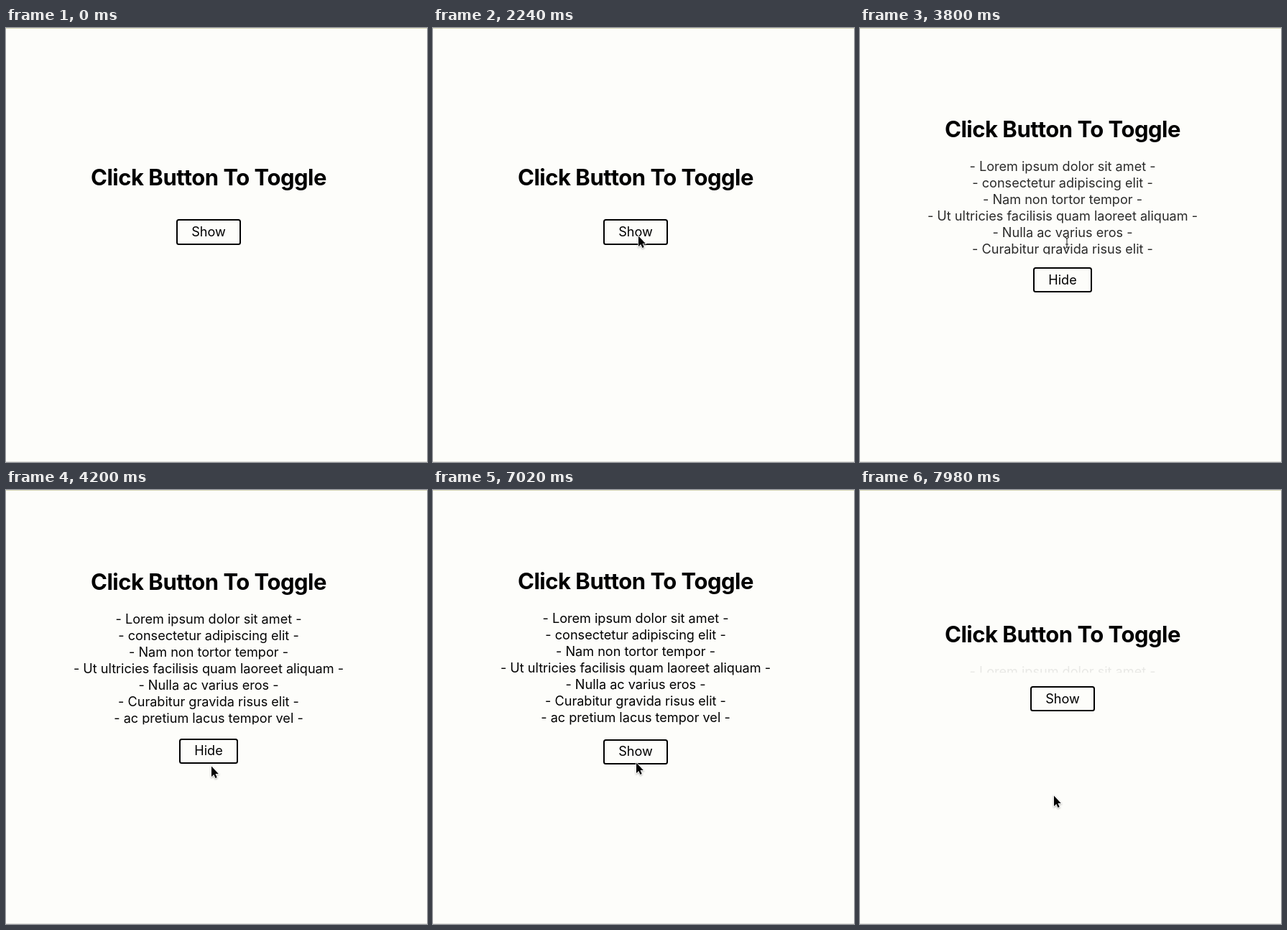
Write an HTML page that moves like this. It is 586 by 604 pixels and loops after 8000 ms.

```html
<!DOCTYPE html>
<html lang="en">
<head>
<meta charset="utf-8">
<title>Toggle</title>
<style>
  html, body { margin: 0; height: 100%; overflow: hidden; background: #fdfdfa; }
  svg { display: block; width: 586px; height: 604px; }
  text { font: 18.1px Inter, sans-serif; font-optical-sizing: none; text-anchor: middle; }
  #title { font-size: 31px; font-weight: 700; letter-spacing: -.49px; }
</style>
</head>
<body>
<svg viewBox="0 0 586 604">
  <defs>
    <clipPath id="clip"><rect id="window" x="80" width="404"/></clipPath>
  </defs>
  <path d="M0 .5H586" stroke="#d9d9b8"/>
  <path d="M0 603.5H586" stroke="#dededa"/>
  <text id="title" x="282">Click Button To Toggle</text>
  <g clip-path="url(#clip)"><g id="list"></g></g>
  <rect id="frame" rx="2.5" fill="none" stroke="#000" stroke-width="2"/>
  <text id="label" x="282"></text>
  <g id="cursor">
    <path id="arrow" d="M0 .5V15L3.3 12 5.5 17 7.7 16 5.5 11H9.8Z" stroke="#fff" stroke-width="1.5"
      paint-order="stroke" style="filter: drop-shadow(0 1px 1px #0005)"/>
    <path id="beam" d="M-3 -7.5Q0 -7.5 0 -5V5Q0 7.5 -3 7.5M3 -7.5Q0 -7.5 0 -5M0 5Q0 7.5 3 7.5M-2 2H2"
      fill="none" stroke="#222"/>
  </g>
</svg>
<script>
const LOOP = 8000, OPEN = 3100, OPEN_TIME = 1320;
const PRESS = 7000, CLOSE = 7015, CLOSE_TIME = 1480;
const LINE = 23, MID = 282;
const lines = [
  'Lorem ipsum dolor sit amet', 'consectetur adipiscing elit', 'Nam non tortor tempor',
  'Ut ultricies facilisis quam laoreet aliquam', 'Nulla ac varius eros',
  'Curabitur gravida risus elit', 'ac pretium lacus tempor vel'
];
// pointer moves: start, end, then where it comes to rest
const entry = { at: 840, x: 363, y: 246 };
const moves = [
  [840, 1200, 346, 379], [1290, 1560, 289, 379], [1660, 2380, 286, 279], [3300, 3700, 288, 299],
  [3920, 4440, 284, 450], [4640, 5020, 283, 379], [7040, 7500, 271, 446], [7560, 7960, 270, 425]
];

const $ = id => document.getElementById(id);
const set = (id, attrs) => {
  for (const name in attrs) $(id).setAttribute(name, attrs[name]);
};

$('list').innerHTML = lines.map((s, i) => `<text x="${MID}" y="${i * LINE}">- ${s} -</text>`).join('');

// cubic-bezier(.25, .1, .25, 1)
function ease(x) {
  if (x <= 0) return 0;
  if (x >= 1) return 1;
  const curve = (u, a, b) => 3 * a * u * (1 - u) ** 2 + 3 * b * u * u * (1 - u) + u ** 3;
  let lo = 0, hi = 1;
  for (let i = 0; i < 24; i++) {
    const u = (lo + hi) / 2;
    if (curve(u, .25, .25) < x) lo = u; else hi = u;
  }
  return curve(lo, .1, 1);
}

function pointer(t) {
  let { x, y } = entry;
  for (const [from, to, restX, restY] of moves) {
    const k = Math.min(1, Math.max(0, (t - from) / (to - from)));
    const s = k * k * (3 - 2 * k);
    x += (restX - x) * s;
    y += (restY - y) * s;
  }
  return [Math.round(x), Math.round(y)];
}

function draw(t) {
  const opened = t >= OPEN && t < PRESS;
  const resting = t >= OPEN + OPEN_TIME && t < PRESS;
  const p = ease((t - OPEN) / OPEN_TIME) - ease((t - CLOSE) / CLOSE_TIME);
  const height = lines.length * LINE * p, half = height / 2;

  // everything snaps to whole pixels
  const titleY = Math.floor(219 - half);
  const listY = titleY + (resting ? 48 : 47);
  const listTop = listY - 18;
  set('title', { y: titleY });
  set('list', { transform: `translate(0 ${listY})`, opacity: p });
  set('window', { y: listTop, height });

  const snap = resting ? Math.floor : Math.ceil;
  const top = snap(266 + half), bottom = Math.floor(302 + half);
  const width = opened ? 80 : 88;
  set('frame', { x: MID - width / 2, y: top + 1, width, height: bottom - top - 2 });
  set('label', { y: Math.round(289.9 + half) });
  $('label').textContent = opened ? 'Hide' : 'Show';

  const [x, y] = pointer(t);
  const overText = y > listTop && y < listTop + height;
  set('cursor', { transform: `translate(${x} ${y})` });
  $('cursor').style.display = t < entry.at ? 'none' : '';
  $('arrow').style.display = overText ? 'none' : '';
  $('beam').style.display = overText ? '' : 'none';
}

const start = performance.now();
function tick() {
  draw((performance.now() - start) % LOOP);
  requestAnimationFrame(tick);
}
tick();
</script>
</body>
</html>
```
